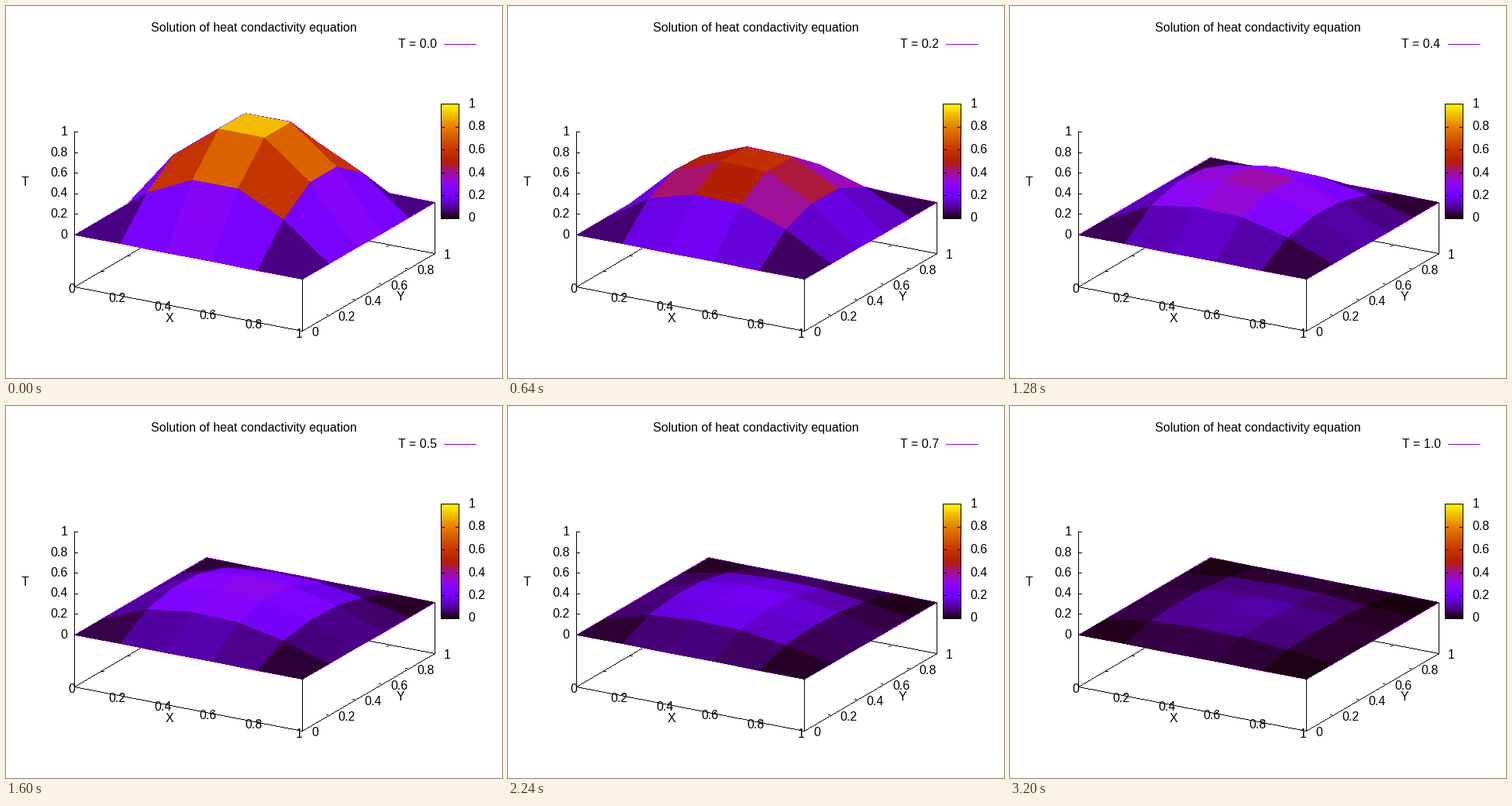
Recreate the animation shown at these times as a matplotlib script. Size 640 by 480 pixels, loop 3.52 s.

```python
import numpy as np
import matplotlib.pyplot as plt
from matplotlib.animation import FuncAnimation
from matplotlib.path import Path

W, H, DPI = 640, 480, 100
FRAMES, INTERVAL = 11, 320
N = 5                       # cells per side
KAPPA, LEAK = 0.34, 0.42    # diffusion number, left-edge ghost ratio
BASE = -0.5                 # height of the box floor
BLACK = (0, 0, 0)
VIOLET = (0x94 / 255, 0, 0xD3 / 255)

plt.rcParams["font.family"] = "Liberation Sans"
plt.rcParams["font.size"] = 16 * 72 / DPI

fig = plt.figure(figsize=(W / DPI, H / DPI), dpi=DPI, facecolor="white")
ax = fig.add_axes([0, 0, 1, 1])
ax.axis("off")


def project(x, y, z):
    return np.array([88 + 294.5 * x + 170.5 * y,
                     295 + 57.3 * x - 99.6 * y - 133 * z])


def palette(v):
    """Black-violet-red-yellow map: sqrt, cube and sine channels."""
    v = np.clip(v, 0, 1)
    rgb = [np.sqrt(v), v ** 3, np.sin(2 * np.pi * v)]
    return np.clip(np.stack(rgb, axis=-1), 0, 1)


def stroke(canvas, points, color=BLACK):
    """Crisp one-pixel polyline."""
    for p, q in zip(points[:-1], points[1:]):
        p, q = np.rint(p), np.rint(q)
        n = int(np.abs(q - p).max()) + 1
        xy = np.rint(np.linspace(p, q, n)).astype(int)
        canvas[xy[:, 1], xy[:, 0]] = color


def fill(canvas, ring, color):
    """Fill the pixels whose centres lie inside the ring."""
    x0, y0 = np.floor(ring.min(axis=0)).astype(int)
    x1, y1 = np.ceil(ring.max(axis=0)).astype(int) + 1
    ys, xs = np.mgrid[y0:y1, x0:x1]
    dots = np.column_stack([xs.ravel(), ys.ravel()])
    inside = Path(ring).contains_points(dots).reshape(xs.shape)
    canvas[y0:y1, x0:x1][inside] = color


def label(x, baseline, text, ha="center"):
    return ax.text(x - 0.5, baseline + 0.5, text, ha=ha, va="baseline")


def profiles():
    """Implicit 1-D heat steps; the surface is the product of two profiles."""
    a = (1 + 2 * KAPPA) * np.eye(N - 1)
    a -= KAPPA * (np.eye(N - 1, k=1) + np.eye(N - 1, k=-1))
    a[0, 0] -= KAPPA * LEAK
    u = np.sin(np.pi * np.arange(1, N) / N)
    rows = []
    for _ in range(FRAMES):
        rows.append(np.pad(u, 1))
        u = np.linalg.solve(a, u)
    return rows


def draw_box(canvas):
    corners = [(0, 0), (1, 0), (1, 1), (0, 1), (0, 0)]
    stroke(canvas, [project(x, y, BASE) for x, y in corners])
    stroke(canvas, [project(0, 0, BASE), project(0, 0, 1)])
    for x, y in corners[1:3]:
        stroke(canvas, [project(x, y, BASE), project(x, y, 0)])

    dx, dy = np.array([4, 0.8]), np.array([3.5, -2])
    for k in range(N + 1):
        v = k / N
        name = f"{v:g}"
        if 0 < k < N:
            for edge, sign in ((0, 1), (1, -1)):
                p, q = project(v, edge, BASE), project(edge, v, BASE)
                stroke(canvas, [p, p + sign * dy])
                stroke(canvas, [q, q + sign * dx])
        p = project(0, 0, v)
        stroke(canvas, [p, p + [4, 0]])
        label(85 + 58.8 * k, 369.5 + 11.5 * k, name)
        label(395 + 34 * k, 425 - 20 * k, name, "left")
        label(80, 299 - 26.5 * k, name, "right")
    label(211, 407, "X")
    label(509, 380, "Y")
    label(25, 232, "T")


def draw_colorbar(canvas):
    left, right, top, bottom = 561, 584, 126, 274
    ramp = palette(np.linspace(1, 0, bottom - top + 1))
    canvas[top:bottom + 1, left:right + 1] = ramp[:, None]
    frame = [(left, top), (right, top), (right, bottom), (left, bottom),
             (left, top)]
    stroke(canvas, np.array(frame))
    for k in range(N + 1):
        y = bottom - (bottom - top) * k / N
        stroke(canvas, np.array([(left, y), (left + 4, y)]))
        stroke(canvas, np.array([(right - 4, y), (right, y)]))
        label(597, 278 - 29.5 * k, f"{k / N:g}", "left")


backdrop = np.ones((H, W, 3))
draw_box(backdrop)
draw_colorbar(backdrop)
stroke(backdrop, np.array([(565, 49), (606, 49)]), VIOLET)
label(320, 33, "Solution of heat condactivity equation")
key = label(556, 53, "", "right")

picture = ax.imshow(backdrop, extent=(0, W, H, 0), aspect="auto",
                    interpolation="nearest")
ax.set_xlim(0, W)
ax.set_ylim(H, 0)

steps = profiles()
gx, gy = np.meshgrid(np.arange(N + 1) / N, np.arange(N + 1) / N, indexing="ij")


def update(frame):
    canvas = backdrop.copy()
    heat = np.outer(steps[frame], steps[frame])
    pts = np.moveaxis(project(gx, gy, heat), 0, -1)
    for k in range(N + 1):
        stroke(canvas, pts[k], VIOLET)
        stroke(canvas, pts[:, k], VIOLET)
    for j in reversed(range(N)):      # far to near
        for i in range(N):
            ring = [(i, j), (i + 1, j), (i + 1, j + 1), (i, j + 1)]
            mean = np.mean([heat[c] for c in ring])
            fill(canvas, np.array([pts[c] for c in ring]), palette(mean))
    picture.set_data(canvas)
    key.set_text(f"T = {frame / 10:.1f}")
    return picture, key


anim = FuncAnimation(fig, update, frames=FRAMES, interval=INTERVAL,
                     repeat=True, repeat_delay=0, blit=False)
plt.show()
```
